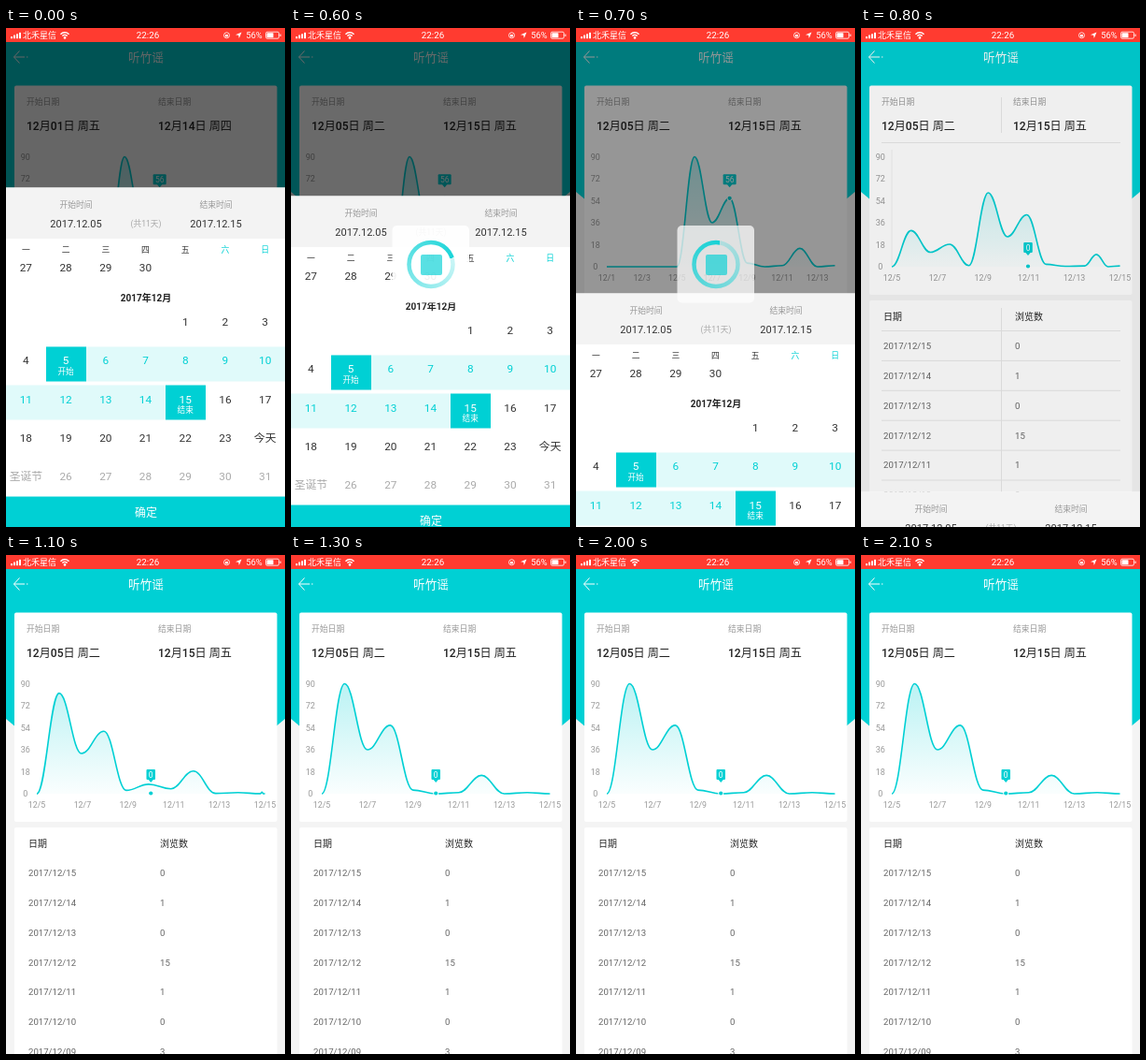
Animation of 299x533 px, one loop 2900 ms. Source, as an HTML page with a canvas:

```html
<!DOCTYPE html>
<html lang="zh">
<head>
<meta charset="utf-8">
<style>
html, body { margin: 0; width: 100%; height: 100%; overflow: hidden; background: #f4f4f4; }
canvas { display: block; width: 299px; height: 533px; }
</style>
</head>
<body>
<canvas></canvas>
<script>
const W = 299, H = 533, LOOP = 2900;
const CYAN = '#00d0d4', FONT = 'Roboto, "Noto Sans CJK SC", "Noto Sans CJK", sans-serif';
const canvas = document.querySelector('canvas');
const ctx = canvas.getContext('2d');
const ratio = window.devicePixelRatio || 1;
canvas.width = W * ratio;
canvas.height = H * ratio;

const mix = (a, b, k) => a + (b - a) * k;
const easeOut = p => 1 - (1 - Math.min(1, Math.max(0, p))) ** 2;

function rect(x, y, w, h, color, radius = 0) {
  ctx.fillStyle = color;
  ctx.beginPath();
  ctx.roundRect(x, y, w, h, radius);
  ctx.fill();
}

function line(points, color, width = 1) {
  ctx.strokeStyle = color;
  ctx.lineWidth = width;
  ctx.beginPath();
  points.forEach(([x, y]) => ctx.lineTo(x, y));
  ctx.stroke();
}

function shape(points, color) {
  ctx.fillStyle = color;
  ctx.beginPath();
  points.forEach(([x, y]) => ctx.lineTo(x, y));
  ctx.fill();
}

function disc(x, y, r, color) {
  ctx.fillStyle = color;
  ctx.beginPath();
  ctx.arc(x, y, r, 0, 7);
  ctx.fill();
}

// y is the visual middle of the glyphs
function text(str, x, y, size, color, align = 'center', weight = 400) {
  ctx.font = `${weight} ${size}px ${FONT}`;
  ctx.textAlign = align;
  ctx.fillStyle = color;
  ctx.fillText(str, x, y + size * 0.37);
}

function statusBar() {
  const white = '#fff';
  rect(0, 0, W, 15, '#ff3b30');
  for (let i = 0; i < 4; i++) rect(5 + i * 3, 9 - i * 1.4, 2, 2.2 + i * 1.4, white, 0.5);
  text('北禾星信', 18, 8, 9, white, 'left');
  ctx.strokeStyle = white;
  ctx.lineWidth = 1.4;
  for (const r of [3.6, 6.2]) {
    ctx.beginPath();
    ctx.arc(63, 11, r, -Math.PI * 0.76, -Math.PI * 0.24);
    ctx.stroke();
  }
  disc(63, 10.4, 1.3, white);
  text('22:26', 152, 7.5, 9.8, white);
  ctx.lineWidth = 0.8;
  ctx.beginPath();
  ctx.arc(236.5, 7.8, 3, 0, 7);
  ctx.stroke();
  rect(235, 7, 3, 2.4, white);
  shape([[252.5, 4.5], [249.8, 11], [249.2, 7.8], [246, 7.2]], white);
  text('56%', 266, 7.8, 9.4, white);
  ctx.strokeStyle = white;
  ctx.beginPath();
  ctx.roundRect(278.5, 4.2, 14, 7, 1.5);
  ctx.stroke();
  rect(279.5, 5.2, 7, 5, white, 0.5);
  rect(293.6, 6.4, 1, 2.6, white);
}

const BASE = 255, LEFT = 33, SPAN = 244.5;
const valueY = v => BASE - v * 1.306;
const before = [0, 0, 0, 0, 0, 90, 36, 56, 3, 0, 1, 15, 0, 1];
const after = [0, 90, 36, 56, 3, 0, 1, 15, 0, 1, 0];

function tooltip(label, x, y) {
  const w = label.length * 4.5 + 5;
  rect(x - w / 2, y - 25.5, w, 11, CYAN, 1);
  shape([[x - 3, y - 15], [x + 3, y - 15], [x, y - 11.5]], CYAN);
  text(label, x, y - 20, 8.5, '#fff');
  disc(x, y, 3, '#fff');
  disc(x, y, 2.1, CYAN);
}

function chart(time, renewed) {
  for (let v = 0; v <= 90; v += 18) text(v, 20.8, valueY(v), 9, '#999');
  const step = SPAN / (renewed ? 10 : 13);
  for (let i = 0; i < (renewed ? 11 : 14); i += 2)
    text('12/' + (i + (renewed ? 5 : 1)), LEFT + i * step, 267, 8.8, '#999');

  // leftover points collapse onto the last new point
  const k = renewed ? easeOut((time - 697) / 571) : 0;
  const points = before.map((v, i) => {
    const j = Math.min(i, 10);
    return [LEFT + SPAN * mix(i / 13, j / 10, k), valueY(mix(v, after[j], k))];
  });
  const curve = new Path2D();
  points.forEach(([x, y], i) => {
    if (!i) return curve.moveTo(x, y);
    const [px, py] = points[i - 1], d = (x - px) * 0.4;
    curve.bezierCurveTo(px + d, py, x - d, y, x, y);
  });
  const area = new Path2D(curve);
  area.lineTo(LEFT + SPAN, BASE);
  area.lineTo(LEFT, BASE);
  const fade = ctx.createLinearGradient(0, 137, 0, BASE);
  fade.addColorStop(0, 'rgba(0,208,212,.27)');
  fade.addColorStop(1, 'rgba(0,208,212,.02)');
  ctx.fillStyle = fade;
  ctx.fill(area);
  ctx.strokeStyle = CYAN;
  ctx.lineWidth = 1.6;
  ctx.lineJoin = 'round';
  ctx.stroke(curve);

  if (renewed) tooltip('0', mix(202, LEFT + SPAN / 2, easeOut((time - 705) / 331)), 254.5);
  else tooltip('56', LEFT + SPAN * 7 / 13, valueY(56));
}

function page(time, step) {
  rect(0, 0, W, H, '#f4f4f4');
  shape([[0, 15], [W, 15], [W, 175], [269, 200], [30, 200], [0, 175]], CYAN);
  line([[14.5, 24.5], [8.5, 31], [14.5, 37.5]], '#fff');
  line([[8.5, 31], [20, 31]], '#fff');
  rect(22, 30.4, 1.4, 1.2, '#fff');
  text('听竹谣', 150, 31, 12.6, '#fff');

  rect(9, 61.5, 281.5, 223.5, '#fff', 2);
  rect(9, 291, 281.5, 260, '#fff', 2);
  if (step === 3) {
    const rule = '#e8e8e8';
    line([[150.5, 74], [150.5, 112]], rule);
    line([[22, 122.5], [278, 122.5]], rule);
    line([[33, 130], [33, BASE]], '#eee');
    line([[150.5, 299], [150.5, H]], rule);
    for (let i = 0; i < 6; i++) line([[22, 323.5 + i * 31.9], [278, 323.5 + i * 31.9]], rule);
  }
  const dates = step ? ['12月05日 周二', '12月15日 周五'] : ['12月01日 周五', '12月14日 周四'];
  ['开始日期', '结束日期'].forEach((label, i) => {
    const x = 22 + i * 141;
    text(label, x, 79, 8.8, '#999', 'left');
    text(dates[i], x, 105, 12.1, '#222', 'left', 500);
  });
  chart(time, step > 2);

  text('日期', 24, 308, 10, '#222', 'left', 500);
  text('浏览数', 165, 308, 10, '#222', 'left', 500);
  [0, 1, 0, 15, 1, 0, 3].forEach((views, i) => {
    const y = 339.5 + i * 31.85;
    text('2017/12/' + String(15 - i).padStart(2, '0'), 24, y, 9.6, '#666', 'left');
    text(views, 165, y, 9.6, '#666', 'left');
  });
}

const CELL = W / 7;
const column = i => (i + 0.5) * CELL;

function sheet(top) {
  ctx.save();
  ctx.translate(0, top);
  rect(0, -0.5, W, 363, '#fff');
  rect(0, -0.5, W, 54.5, '#f3f3f3');
  text('开始时间', 75, 17.3, 8.8, '#999');
  text('结束时间', 225, 17.3, 8.8, '#999');
  text('2017.12.05', 75, 37.6, 11, '#333');
  text('2017.12.15', 225, 37.6, 11, '#333');
  text('(共11天)', 150, 38, 8.6, '#aaa');

  [...'一二三四五六日'].forEach((day, i) => text(day, column(i), 66, 8.8, i > 4 ? CYAN : '#333'));
  for (let i = 0; i < 4; i++) text(27 + i, column(i), 84.5, 11.8, '#333');
  text('2017年12月', 150, 117.3, 10, '#222', 'center', 700);

  rect(43, 169.5, W - 43, 37, '#e0fafa');
  rect(0, 210.5, 171, 37, '#e0fafa');
  rect(43, 169.5, 43, 37, CYAN);
  rect(171, 210.5, 43, 37, CYAN);
  for (let day = 1; day <= 31; day++) {
    const slot = day + 3, x = column(slot % 7), y = 142.6 + Math.floor(slot / 7) * 41.35;
    const end = { 5: '开始', 15: '结束' }[day];
    const color = end ? '#fff' : day > 5 && day < 15 ? CYAN : day > 24 ? '#aaa' : '#333';
    text({ 24: '今天', 25: '圣诞节' }[day] || day, x, y, 11.8, color);
    if (end) text(end, x, y + 11.6, 8.6, '#fff');
  }
  rect(0, 329.5, W, 33, CYAN);
  text('确定', 150, 346.3, 12, '#fff');
  ctx.restore();
}

function loader(opacity, turn) {
  rect(108.5, 211, 82.5, 82.5, `rgba(255,255,255,${opacity})`, 5);
  const ring = ctx.createConicGradient(turn, 150, 252.5);
  ring.addColorStop(0, 'rgba(0,208,212,.2)');
  ring.addColorStop(1, 'rgba(0,208,212,.9)');
  ctx.strokeStyle = ring;
  ctx.lineWidth = 4.5;
  ctx.beginPath();
  ctx.arc(150, 252.5, 23.5, 0, 7);
  ctx.stroke();
  rect(139, 242, 23, 22, 'rgba(0,208,212,.65)', 2);
}

const drops = [0, 9, 113, 325, 362];

function draw(now) {
  // the picture advances in 100 ms steps between 600 and 1300
  const step = Math.min(8, Math.max(0, Math.floor(now % LOOP / 100) - 5));
  const drop = drops[Math.min(step, 4)];
  ctx.setTransform(ratio, 0, 0, ratio, 0, 0);
  page(500 + step * 100, step);
  rect(0, 15, W, H, `rgba(0,0,0,${0.6 * (1 - drop / 362)})`);
  if (drop < 362) sheet(171 + drop);
  if (step === 1) loader(0.92, -0.3);
  if (step === 2) loader(0.72, -1.4);
  statusBar();
  requestAnimationFrame(draw);
}
requestAnimationFrame(draw);
</script>
</body>
</html>
```
